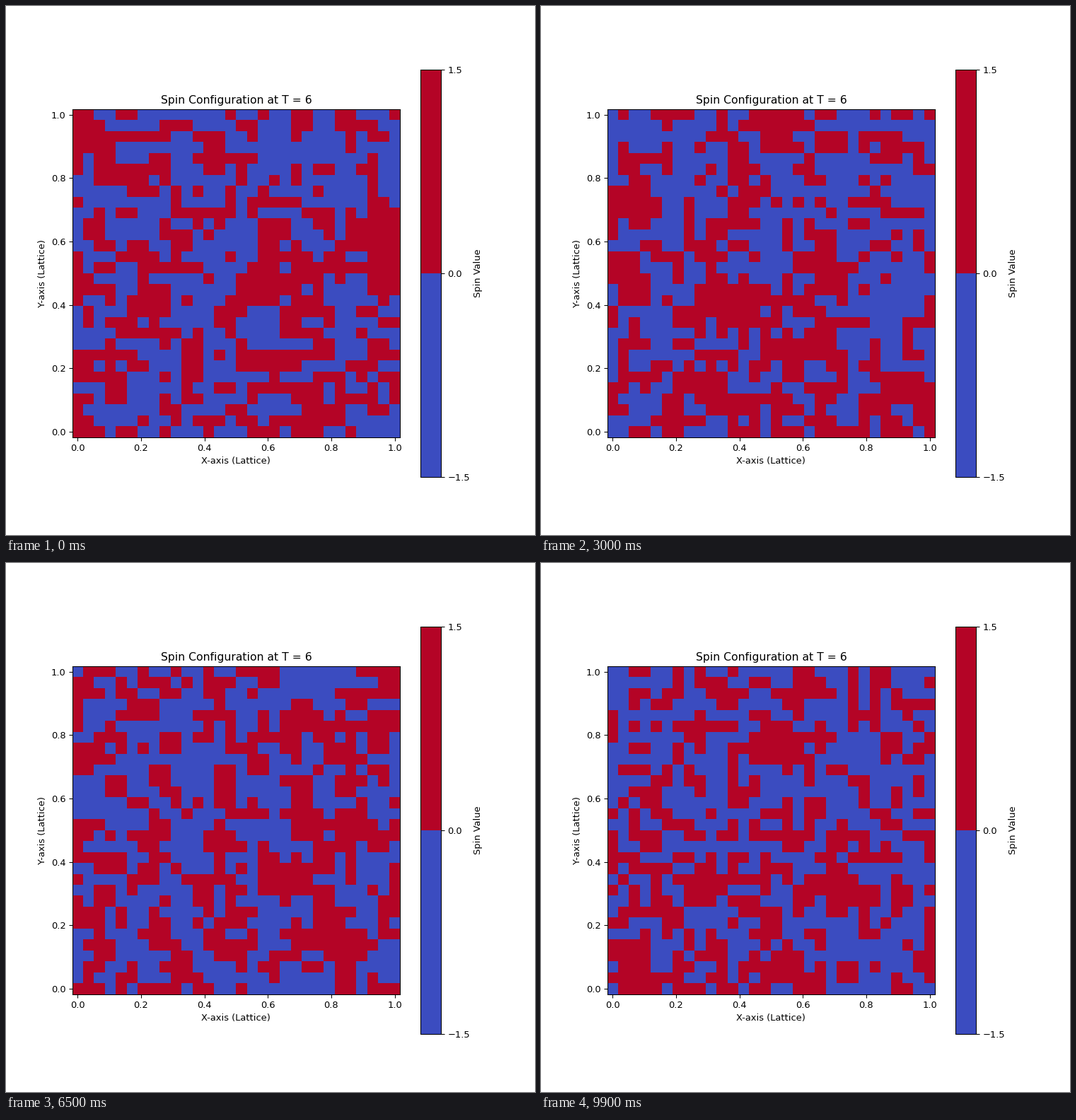
These frames come from a looping animation (748 by 748 pixels, 10000 ms). A matplotlib script:

```python
import random

import matplotlib.pyplot as plt
import numpy as np
from matplotlib.animation import FuncAnimation
from matplotlib.colors import BoundaryNorm

N = 30
T = 6
FRAMES = 100
INTERVAL = 100

rng = random.Random(12)
# Metropolis acceptance, indexed by spin times neighbour sum
ACCEPT = {k: min(1.0, float(np.exp(-2 * k / T))) for k in (-4, -2, 0, 2, 4)}


def sweep(s):
    """One Metropolis sweep of randomly picked sites, periodic edges."""
    for _ in range(N * N):
        i, j = rng.randrange(N), rng.randrange(N)
        near = s[i - 1][j] + s[(i + 1) % N][j] + s[i][j - 1] + s[i][(j + 1) % N]
        if rng.random() < ACCEPT[s[i][j] * near]:
            s[i][j] = -s[i][j]


def simulate():
    s = [[rng.choice((-1, 1)) for _ in range(N)] for _ in range(N)]
    for _ in range(5):
        sweep(s)
    states = []
    for _ in range(FRAMES):
        states.append(np.array(s))
        sweep(s)
    return states


states = simulate()

fig, ax = plt.subplots(figsize=(8, 8), dpi=93.5)
cmap = plt.get_cmap("coolwarm", 2)
norm = BoundaryNorm([-1.5, 0, 1.5], cmap.N)
grid = np.linspace(0, 1, N)
mesh = ax.pcolormesh(grid, grid, states[0], cmap=cmap, norm=norm,
                     shading="nearest")
ax.set_aspect("equal")
ax.set_title(f"Spin Configuration at T = {T}")
ax.set_xlabel("X-axis (Lattice)")
ax.set_ylabel("Y-axis (Lattice)")
fig.colorbar(mesh, ax=ax, label="Spin Value")


def update(frame):
    mesh.set_array(states[frame])
    return (mesh,)


anim = FuncAnimation(fig, update, frames=FRAMES, interval=INTERVAL,
                     repeat=True, repeat_delay=0)
plt.show()
```
